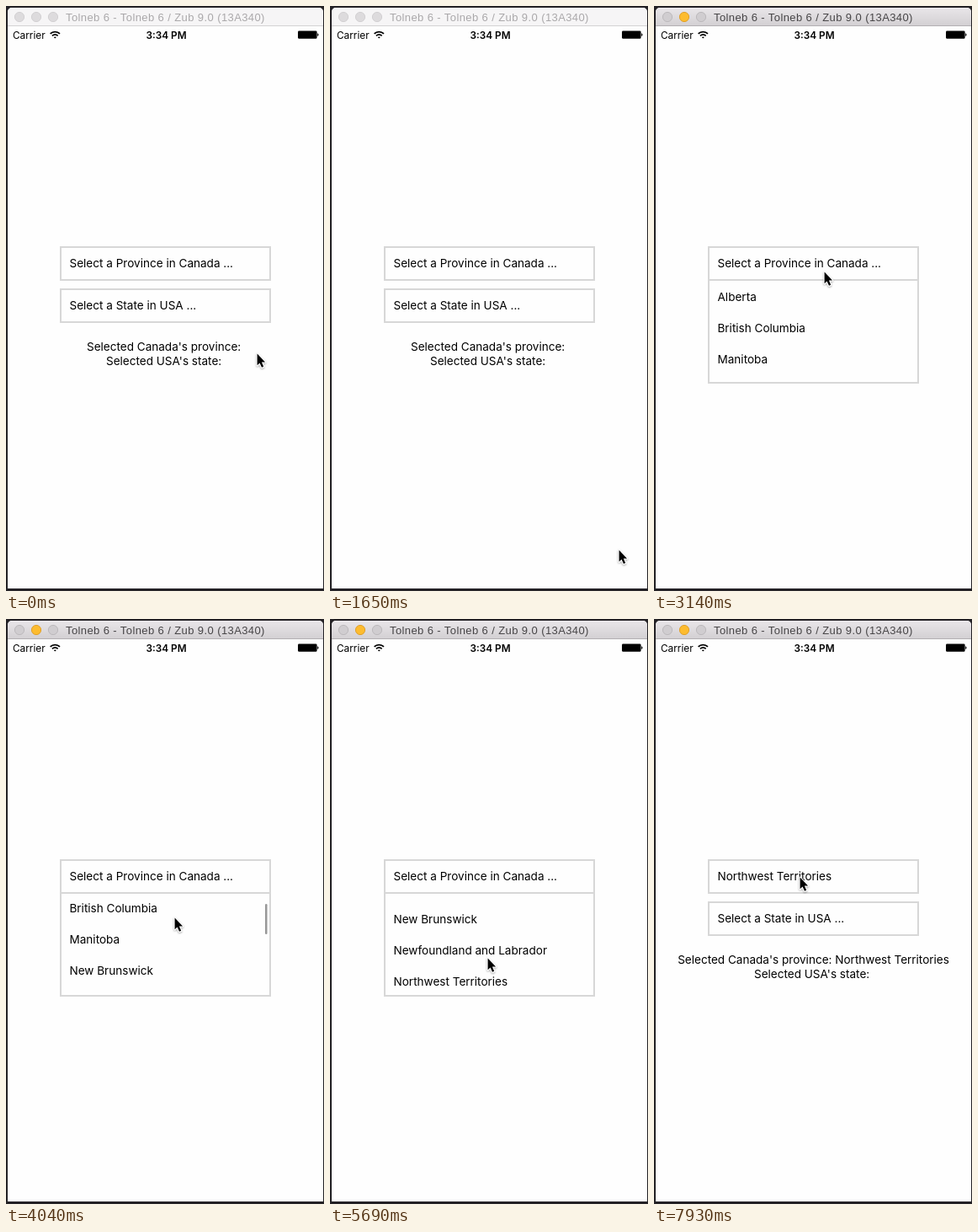
Write an HTML page that moves like this. It is 378 by 694 pixels and loops after 8000 ms.

```html
<!DOCTYPE html>
<html lang="en">
<head>
<meta charset="utf-8">
<title>Dropdown demo</title>
<style>
  html, body { margin: 0; width: 100%; height: 100%; overflow: hidden; background: #232125; }
  svg { display: block; width: 378px; height: 694px; }
  text { font: 13.55px Inter, "Open Sans", sans-serif; fill: #000; white-space: pre; }
  .title { font: 13px "Liberation Sans", Arial, sans-serif; letter-spacing: .4px; }
  .status { font-size: 11.8px; }
  .time { font-size: 11.8px; font-weight: 600; }
  .mid { text-anchor: middle; }
  .box { fill: #fefefe; stroke: #d7d7d7; stroke-width: 2; }
</style>
</head>
<body>
<svg viewBox="0 0 378 694">
  <defs>
    <linearGradient id="barFill" x1="0" y1="0" x2="0" y2="1">
      <stop offset="0" stop-color="#e9e6e9"/>
      <stop offset="1" stop-color="#d2cfd2"/>
    </linearGradient>
    <clipPath id="listClip"><rect x="66" y="326" width="247" height="120"/></clipPath>
    <filter id="shade" x="-50%" y="-50%" width="200%" height="200%">
      <feDropShadow dx="0" dy="1" stdDeviation="0.9" flood-opacity=".4"/>
    </filter>
  </defs>

  <rect width="378" height="694" fill="#232125"/>
  <path d="M2 691V7a5 5 0 0 1 5-5H372a5 5 0 0 1 5 5V691Z" fill="#fefefe"/>
  <path id="bar" d="M2 24V7a5 5 0 0 1 5-5H372a5 5 0 0 1 5 5V24Z"/>
  <path id="barLine" d="M2 23.5H377"/>
  <g id="dots"></g>
  <text id="title" class="title" x="71" y="18">Tolneb 6 - Tolneb 6 / Zub 9.0 (13A340)</text>

  <text class="status" x="8" y="38.5">Carrier</text>
  <g id="wifi" fill="none" stroke="#000" stroke-width="1.8"></g>
  <text class="time mid" x="190.5" y="38.5">3:34 PM</text>
  <rect x="347" y="29.4" width="22.6" height="9.4" rx="1.4"/>
  <path d="M370.2 32.2a2 2 0 0 1 0 3.8Z"/>

  <rect class="box" x="65" y="286" width="249" height="39"/>
  <text id="province" x="75.5" y="310"></text>
  <rect class="box" x="65" y="336" width="249" height="39"/>
  <text x="75.5" y="360">Select a State in USA ...</text>
  <text id="result" class="mid" x="189.5" y="409"></text>
  <text class="mid" x="189.5" y="426">Selected USA's state: </text>

  <g id="list">
    <rect class="box" x="65" y="325" width="249" height="122"/>
    <g clip-path="url(#listClip)"><g id="items"></g></g>
    <rect id="thumb" x="308" width="2.5" height="36" rx="1.25" fill="#000" fill-opacity=".4"/>
  </g>

  <g id="cursor" filter="url(#shade)">
    <path d="M.6 .6V14.2L3.6 11.4L6 16.8L8.2 15.8L5.9 10.5H10.1Z"
      stroke="#fff" stroke-width="2" stroke-linejoin="round" paint-order="stroke"/>
  </g>
</svg>
<script>
const LOOP = 8000, STEP = 150;
const FOCUS = 2540, OPEN = 2690, PICK = 6740;
const ROW = 37;
const provinces = ["Alberta", "British Columbia", "Manitoba", "New Brunswick",
  "Newfoundland and Labrador", "Northwest Territories", "Nova Scotia"];
const picked = provinces[5];

// Key points: time, then values
const pointerKeys = [
  [0, 298, 412], [300, 303, 417], [900, 288, 400], [1050, 288, 400],
  [1550, 351, 665], [2240, 208, 311], [2990, 208, 311],
  [3140, 202, 315], [3560, 200, 405], [4340, 200, 329], [4600, 234, 385], [5250, 234, 353],
  [5990, 160, 430], [6740, 160, 430], [7780, 160, 306], [7930, 173, 306]
];
const scrollKeys = [[3660, 0], [4340, 67], [4600, 67], [5250, 100]];
const thumbKeys = [[3660, 0], [3800, 1], [5400, 1], [5700, 0]];

const $ = id => document.getElementById(id);
function add(parent, tag, attrs, text = "") {
  const el = document.createElementNS("http://www.w3.org/2000/svg", tag);
  for (const key in attrs) el.setAttribute(key, attrs[key]);
  el.textContent = text;
  parent.append(el);
  return el;
}

const dots = [16, 36, 56].map(cx => add($("dots"), "circle", { cx, cy: 13, r: 5.6 }));
provinces.forEach((name, i) => add($("items"), "text", { x: 75.5, y: 350 + ROW * i }, name));

for (const r of [1.3, 4.7, 8]) {
  const d = r * Math.SQRT1_2;
  add($("wifi"), "path", { d: `M${58.3 - d} ${38.6 - d}A${r} ${r} 0 0 1 ${58.3 + d} ${38.6 - d}` });
}

// Smooth ease between neighbouring keys, held at both ends
function tween(keys, t) {
  const next = keys.findIndex(key => key[0] > t);
  if (next < 0) return keys[keys.length - 1].slice(1);
  if (next === 0) return keys[0].slice(1);
  const a = keys[next - 1], b = keys[next];
  const p = (t - a[0]) / (b[0] - a[0]), ease = p * p * (3 - 2 * p);
  return a.slice(1).map((v, i) => v + (b[i + 1] - v) * ease);
}

function hold(t) {
  const shift = 10 * ((t >= 2240) + (t >= 7780));
  return Math.floor((t + shift) / STEP) * STEP - shift;
}

function paint(el, fill, stroke) {
  el.setAttribute("fill", fill);
  el.setAttribute("stroke", stroke);
}

function drawWindow(active) {
  $("bar").setAttribute("fill", active ? "url(#barFill)" : "#f6f5f6");
  $("barLine").setAttribute("stroke", active ? "#b3b0b3" : "#d4d2d4");
  $("title").style.fill = active ? "#474547" : "#aaa8aa";
  for (const dot of dots) paint(dot, active ? "#d0cdd0" : "#dddbdd", active ? "#bcb9bc" : "#d2d0d2");
  if (active) paint(dots[1], "#fdbc2f", "#e0a02a");
}

function draw(time) {
  const t = hold(time), done = t >= PICK;
  drawWindow(t >= FOCUS);

  $("province").textContent = done ? picked : "Select a Province in Canada ...";
  $("result").textContent = "Selected Canada's province: " + (done ? picked : "");

  const [scroll] = tween(scrollKeys, t);
  $("list").style.display = t >= OPEN && !done ? "" : "none";
  $("items").setAttribute("transform", `translate(0 ${-Math.round(scroll)})`);
  $("thumb").setAttribute("y", 329.5 + scroll * .217);
  $("thumb").setAttribute("opacity", tween(thumbKeys, t)[0]);

  const [x, y] = tween(pointerKeys, t).map(Math.round);
  $("cursor").setAttribute("transform", `translate(${x} ${y})`);
}

const start = performance.now();
function tick() {
  draw((performance.now() - start) % LOOP);
  requestAnimationFrame(tick);
}
tick();
</script>
</body>
</html>
```
